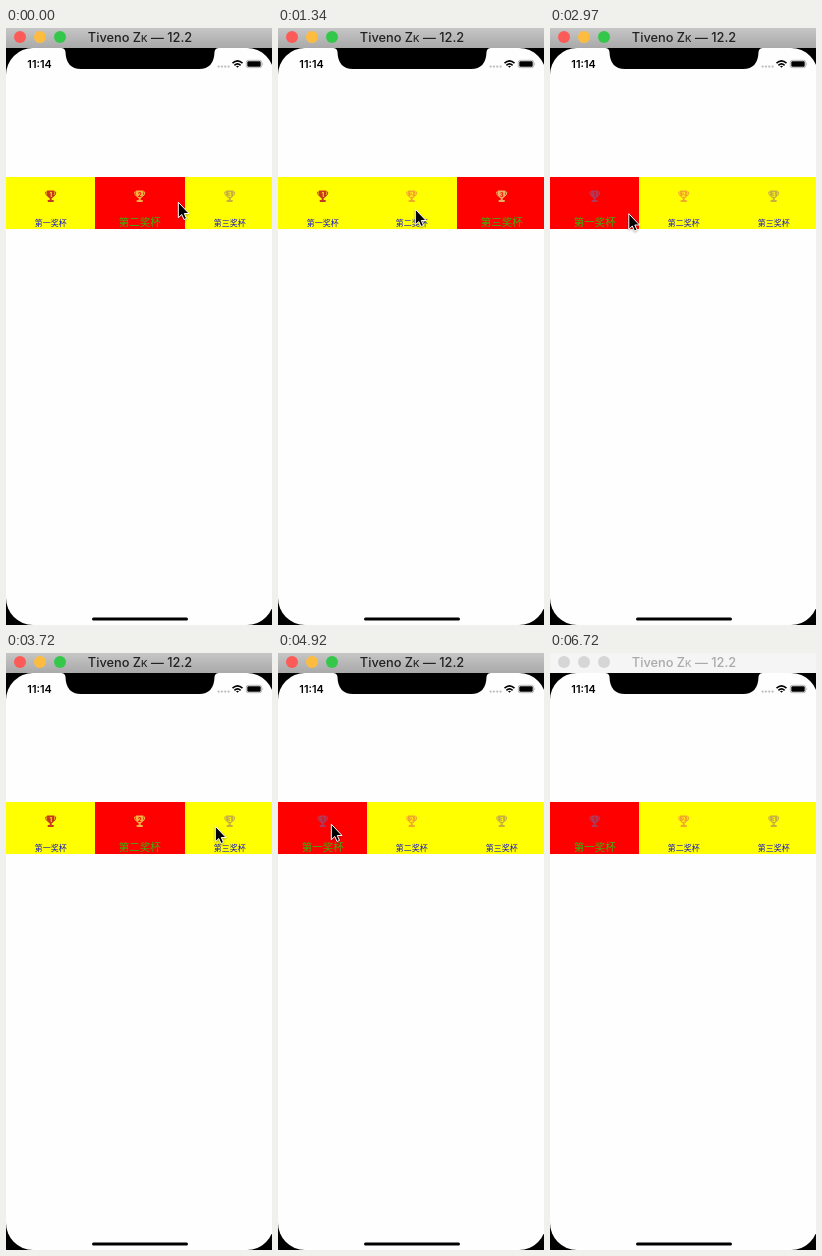
Animation, 266 px wide and 597 px high, one loop 6.74 s. Source, as an HTML page:

```html
<!DOCTYPE html>
<html lang="zh">
<head>
<meta charset="utf-8">
<style>
html, body { margin: 0; width: 100%; height: 100%; overflow: hidden; background: #000; }
svg { display: block; }
text { text-anchor: middle; font-family: Inter, "Noto Sans CJK SC", "Noto Sans CJK", sans-serif; }
#title { fill: url(#bar); }
#name { fill: #222; font-weight: 500; }
.idle #title { fill: #f5f5f5; }
.idle #name { fill: #aaa; }
.idle #lights { fill: #d6d6d6; }
.idle #lights circle { fill: inherit; }
.tab { --back: #ff0; color: var(--off); }
.tab.on { --back: #f00; color: var(--lit); }
.tab rect, .digit { fill: var(--back); }
.digit { font-size: 6px; font-weight: 700; }
.label { font-size: 8px; fill: #1818c8; }
.on .label { font-size: 10.5px; font-weight: 500; fill: #30b808; }
</style>
</head>
<body>
<svg id="stage" width="266" height="597" viewBox="0 0 266 597">
  <defs>
    <linearGradient id="bar" x2="0" y2="1">
      <stop stop-color="#c6c6c6"/><stop offset="1" stop-color="#a9a9a9"/>
    </linearGradient>
    <g id="cup" fill="currentColor">
      <path d="M-3.700-5.700H3.700V-2Q3.500 1.600 0 2.200Q-3.500 1.600-3.700-2ZM-1 1.800H1V3.800H3V5.700H-3V3.800H-1Z"/>
      <path d="M-3.700-4.300H-5.100Q-5.100-.4-2.500 0M3.700-4.300H5.100Q5.100-.4 2.500 0" fill="none" stroke="currentColor"/>
    </g>
  </defs>
  <rect id="title" width="266" height="20"/>
  <g id="lights">
    <circle cx="14" cy="9" r="6" fill="#fc5b57"/>
    <circle cx="34" cy="9" r="6" fill="#fdbc40"/>
    <circle cx="54" cy="9" r="6" fill="#34c84a"/>
  </g>
  <text id="name" x="134" y="13.8" font-size="12.8">Tiveno Z<tspan font-size="9.5">K</tspan> — 12.2</text>

  <rect y="20" width="268" height="577" rx="27" fill="#fefefe"/>
  <path d="M55 20Q59 20 59.500 24Q60 41 75 41H193Q208 41 208.500 24Q209 20 213 20Z"/>
  <text x="33.500" y="39.700" font-size="10.800" font-weight="600">11:14</text>
  <path d="M212.600 38.600H223" stroke="#bcbcbc" stroke-width="2.300" stroke-linecap="round" stroke-dasharray="0 3.330"/>
  <g fill="none" stroke="#000" stroke-width="1.600">
    <path d="M226.500 35.200Q231.500 30.600 236.500 35.200M228.400 37.300Q231.500 34.500 234.600 37.300"/>
    <path d="M230 38.300Q231.500 37.200 233 38.300L231.500 39.800Z" fill="#000" stroke="none"/>
  </g>
  <rect x="240.300" y="32.300" width="15.400" height="7.400" rx="2" fill="none" stroke="#999" stroke-width=".7"/>
  <rect x="241.300" y="33.300" width="13.400" height="5.400" rx="1.200"/>
  <path d="M256.600 34.700Q258 36 256.600 37.300Z" fill="#999"/>

  <g id="tabs"></g>
  <rect x="86" y="589.500" width="96" height="3" rx="1.500"/>
  <path id="cursor" d="M.3 .2V15.800L3.800 12.500L6 17.500L8.500 16.400L6.300 11.500H11Z"
    stroke="#fff" style="filter:drop-shadow(0 1px 1px #0005)"/>
</svg>
<script>
const LOOP = 6740, IDLE = 6720, TICK = 149, TAB = 268 / 3, EXIT = 43;
const $ = id => document.getElementById(id);

const tabs = [
  { label: '第一奖杯', off: '#c83a20', lit: '#b03858' },
  { label: '第二奖杯', off: '#f2a82c', lit: '#f4b040' },
  { label: '第三奖杯', off: '#c8b040', lit: '#e8b066' }
];

// Pointer trips: times in ticks, (x, y) is where the trip ends
const home = { x: 172, y: 174 };
const trips = [
  { from: 0, to: 2, click: 3, x: 208, y: 175 },
  { from: 5, to: 9, click: 10, x: 137, y: 181 },
  { from: 12, to: 14, click: 16, x: 47, y: 190 },
  { from: 17, to: 21, click: 22, x: 110, y: 181 },
  { from: 23, to: 25, click: 27, x: 209, y: 173 },
  { from: 27, to: 29, click: 30, x: 156, y: 173 },
  { from: 30, to: 32, click: 33, x: 53, y: 171 },
  { from: 36, to: 39, x: 158, y: 202 },
  { from: 39, to: 42, x: 219, y: 568 }
];

const smooth = u => u * u * (3 - 2 * u);
const mix = (a, b, u) => a + (b - a) * u;

function pointer(tick) {
  const i = trips.findLastIndex(trip => trip.from <= tick);
  const end = trips[i], begin = trips[i - 1] || home;
  const u = smooth(Math.min(1, (tick - end.from) / (end.to - end.from)));
  return [mix(begin.x, end.x, u), mix(begin.y, end.y, u)];
}

// A click selects the tab under the pointer
function selected(tick) {
  const { x } = trips.findLast(trip => trip.click <= tick) || home;
  return Math.floor(x / TAB);
}

$('tabs').innerHTML = tabs.map(({ label, off, lit }, i) => `
  <g class="tab" style="--off:${off};--lit:${lit}" transform="translate(${Math.round(i * TAB)} 149)">
    <rect width="90" height="52"/>
    <use href="#cup" x="44.7" y="19.3"/>
    <text class="digit" x="44.7" y="19.6">${i + 1}</text>
    <text class="label" x="44.7" y="48.5">${label}</text>
  </g>`).join('');

function draw(t) {
  const tick = Math.floor((t + 8) / TICK), pick = selected(tick);
  [...$('tabs').children].forEach((tab, i) => tab.classList.toggle('on', i === pick));
  $('cursor').setAttribute('transform', `translate(${pointer(tick)})`);
  $('cursor').setAttribute('visibility', tick < EXIT ? 'visible' : 'hidden');
  $('stage').classList.toggle('idle', t >= IDLE);
}

const start = performance.now();
function loop() {
  draw((performance.now() - start) % LOOP);
  requestAnimationFrame(loop);
}
loop();
</script>
</body>
</html>
```
